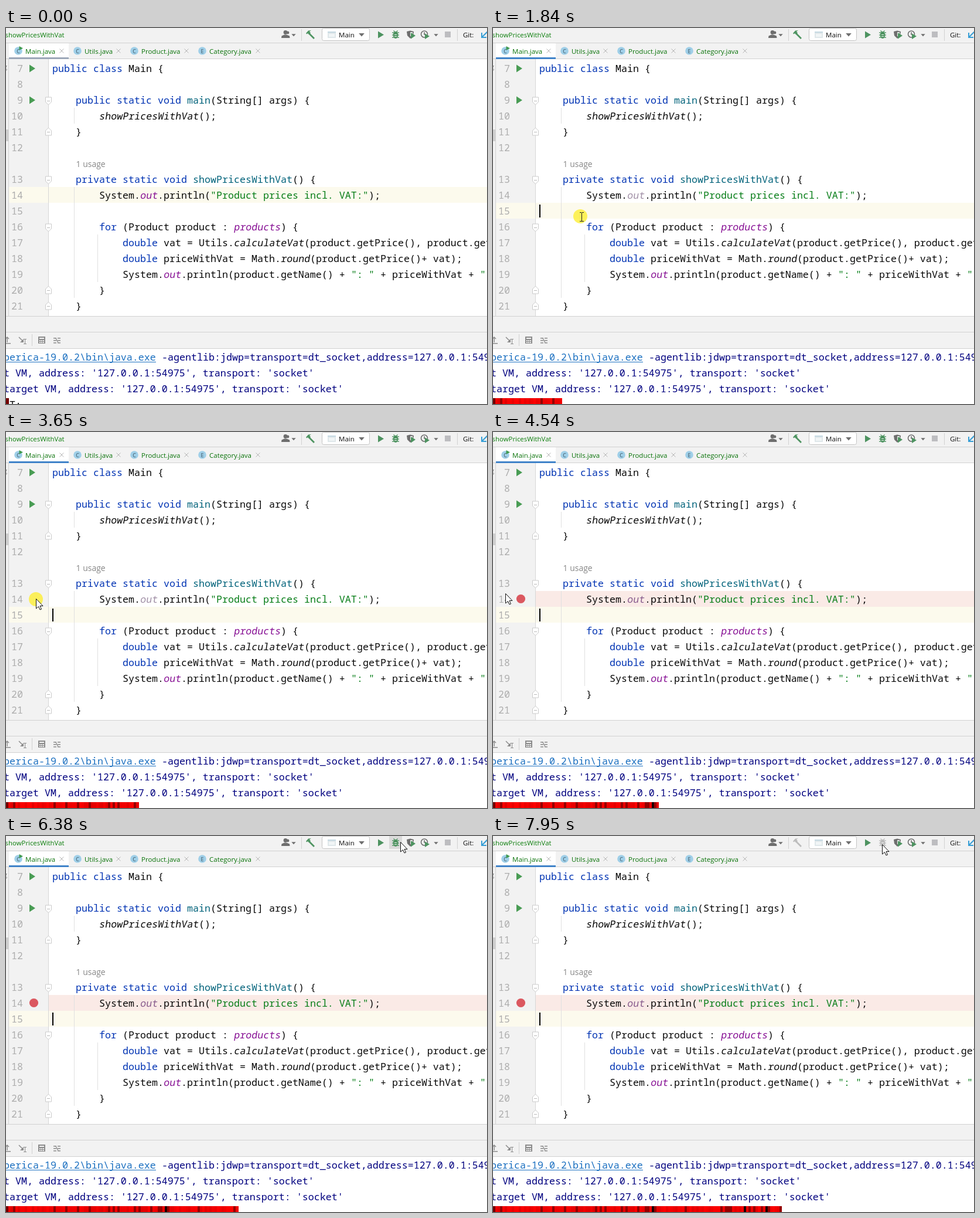
An HTML page with a canvas for the animation above (8 s loop, 821 by 641 pixels).

```html
<!DOCTYPE html>
<html lang="en">
<head>
<meta charset="utf-8">
<title>Setting a breakpoint</title>
<style>
html, body { margin: 0; width: 100%; height: 100%; overflow: hidden; background: #fff; }
canvas { display: block; }
</style>
</head>
<body>
<canvas id="stage" width="821" height="641"></canvas>
<script>
const ctx = document.getElementById('stage').getContext('2d');
const W = 821, H = 641, LOOP = 8000;
const MONO = '16.667px "Noto Sans Mono", monospace';
const UI = '"Open Sans", sans-serif';
const PANEL = '#f2f2f2', EDGE = '#d1d1d1', GREY = '#6e6e6e', GREEN = '#4d9360';
const INK = { k: '#0033b3', m: '#00627a', f: '#871094', s: '#067d17', p: '#080808', i: '#080808' };
const SLANT = .16;

// Event times in ms
const FOCUS = 1610, BREAK = 3700, LAUNCH = 7720;
const CLICKS = [[1640, 1900, 149, 321], [3600, 3860, 51, 285], [7480, 7780, 664, 14]];

// Pointer path: time, x, y
const PATH = [
  [250, 727, 641], [600, 550, 485], [810, 362, 348], [1490, 118, 306],
  [1640, 151, 322], [1900, 151, 322], [2400, 54, 283], [3020, 51, 283],
  [3280, 45, 283], [3600, 51, 284], [3900, 51, 284], [4540, 21, 275],
  [4950, 23, 276], [5060, 36, 274], [5760, 496, 159], [6250, 673, 10],
  [6900, 673, 10], [7300, 664, 14], [8000, 664, 14]
];

// Code rows: line number, column, then kind:text pieces
const CODE = [
  [7, 0, 'k:public class ', 'p:Main {'],
  [9, 4, 'k:public static void ', 'm:main', 'p:(String[] args) {'],
  [10, 8, 'i:showPricesWithVat', 'p:();'],
  [11, 4, 'p:}'],
  [13, 4, 'k:private static void ', 'm:showPricesWithVat', 'p:() {'],
  [14, 8, 'p:System.', 'f:out', 'p:.println(', 's:"Product prices incl. VAT:"', 'p:);'],
  [16, 8, 'k:for ', 'p:(Product product : ', 'f:products', 'p:) {'],
  [17, 12, 'k:double ', 'p:vat = Utils.', 'i:calculateVat', 'p:(product.getPrice(), product.getVat());'],
  [18, 12, 'k:double ', 'p:priceWithVat = Math.', 'i:round', 'p:(product.getPrice()+ vat);'],
  [19, 12, 'p:System.', 'f:out', 'p:.println(product.getName() + ', 's:": "', 'p: + priceWithVat + ', 's:" "'],
  [20, 8, 'p:}'],
  [21, 4, 'p:}']
];

const rowY = n => 75 + (n - 7 + (n > 12 ? 1 : 0)) * 27;

function box(x, y, w, h, color) {
  ctx.fillStyle = color;
  ctx.fillRect(x, y, w, h);
}

function text(s, x, y, color, font) {
  ctx.font = font;
  ctx.fillStyle = color;
  ctx.fillText(s, x, y);
}

function slanted(s, x, y, color) {
  ctx.save();
  ctx.transform(1, 0, -SLANT, 1, x - .5, y);
  text(s, 0, 0, color, MONO);
  ctx.restore();
}

const ui = (s, x, y, color = '#111', size = 11.5) => text(s, x, y, color, `${size}px ${UI}`);

function trace(pts, closed) {
  ctx.beginPath();
  for (let i = 0; i < pts.length; i += 2) ctx.lineTo(pts[i], pts[i + 1]);
  if (closed) ctx.closePath();
}

function poly(color, ...pts) {
  trace(pts, true);
  ctx.fillStyle = color;
  ctx.fill();
}

function line(color, width, ...pts) {
  trace(pts, false);
  ctx.strokeStyle = color;
  ctx.lineWidth = width;
  ctx.stroke();
}

function disc(x, y, r, color) {
  ctx.beginPath();
  ctx.arc(x, y, r, 0, Math.PI * 2);
  ctx.fillStyle = color;
  ctx.fill();
}

function ring(x, y, r, color, width) {
  ctx.beginPath();
  ctx.arc(x, y, r, 0, Math.PI * 2);
  ctx.strokeStyle = color;
  ctx.lineWidth = width;
  ctx.stroke();
}

const down = (x, y, r = 4) => poly(GREY, x - r, y - r / 2, x + r, y - r / 2, x, y + r / 2 + .5);

function bug(x, y, color) {
  for (const dy of [-3, 1, 5]) line(color, 1.4, x - 6, y + dy, x + 6, y + dy);
  line(color, 1.3, x - 3.5, y - 6.5, x - 1, y - 4, x + 1, y - 4, x + 3.5, y - 6.5);
  ctx.beginPath();
  ctx.ellipse(x, y + 1, 4.2, 6, 0, 0, Math.PI * 2);
  ctx.fillStyle = color;
  ctx.fill();
  box(x - 2, y, 4, 1, PANEL);
  box(x - 2, y + 3, 4, 1, PANEL);
}

function hammer(color) {
  line(color, 2.6, 517, 9, 526, 18);
  poly(color, 512, 9, 516, 4.5, 521, 4, 518, 6, 520, 8.5, 517, 11, 515, 9, 513.5, 10.5);
}

function toolbar(t, pos) {
  const busy = t >= LAUNCH;
  box(0, 0, W, 25, PANEL);
  ctx.textAlign = 'right';
  ui('showPricesWithVat', 99.5, 16, '#0a7d0a', 11.4);
  ctx.textAlign = 'left';

  disc(477, 7.5, 3.4, GREY);
  poly(GREY, 470, 17, 470.5, 13.5, 475, 11.5, 479, 11.5, 484, 13.5, 484.5, 17);
  disc(481, 8, 2.4, GREY);
  down(491, 12, 3.7);
  box(504, 2, 1, 20, EDGE);
  hammer(busy ? '#bcbcbc' : GREEN);

  ctx.beginPath();
  ctx.roundRect(539.5, .5, 81, 21, 3);
  ctx.fillStyle = '#fff';
  ctx.fill();
  ctx.strokeStyle = '#c4c4c4';
  ctx.lineWidth = 1;
  ctx.stroke();
  box(549, 6, 14, 11, '#dfe7ea');
  box(549, 6, 14, 2, '#c5d9e2');
  box(551, 10, 10, 5, '#f1f5f6');
  ui('Main', 568, 16);
  down(607, 11.5, 4.8);

  poly(GREEN, 635, 5.5, 645, 11.5, 635, 17.5);
  if (!busy && pos && pos[0] > 653 && pos[0] < 677 && pos[1] < 24) box(654, 0, 22, 22, '#dadada');
  bug(665, 11, busy ? '#bcbcbc' : GREEN);

  poly(GREY, 684, 6, 690, 4.5, 696, 6, 695, 12, 690, 18, 685, 13);
  box(690, 7, 4, 7, PANEL);
  poly(GREEN, 691, 8, 699, 13, 691, 18.5);
  ring(714, 10.5, 5.5, GREY, 1.6);
  line(GREY, 1.5, 714, 7, 714, 11, 717, 11);
  poly(GREEN, 715, 9.5, 723, 14, 715, 19);
  down(734, 12, 3.7);
  box(749, 6, 10, 10, '#bdbdc0');
  box(770, 2, 1, 20, EDGE);
  ui('Git:', 780, 16);
  line('#389fd6', 2, 823, 5, 813, 15);
  line('#389fd6', 2, 812, 8, 812, 16, 820, 16);
}

function tabs(t) {
  box(0, 25, W, 28, PANEL);
  box(0, 25, W, 1, EDGE);
  box(0, 52, W, 1, EDGE);
  box(5, 26, 102, 26, '#fff');
  box(5, 50, 102, 3, t < FOCUS ? '#9ca7b8' : '#4083c9');
  const list = [[21, 'Main', 95], [122, 'Utils', 192], [219, 'Product', 308], [335, 'Category', 430]];
  ctx.textAlign = 'center';
  for (const [x] of list) {
    disc(x, 39, 6.8, '#9fcfe8');
    ui(x === 335 ? 'E' : 'C', x, 42.5, '#38515f', 9);
  }
  ctx.textAlign = 'left';
  poly('#3f9a50', 22.5, 31, 29, 34.5, 22.5, 38);
  for (const [x, name, close] of list) {
    ui(name + '.java', x + 12, 44, '#0a730a');
    line('#b5b5b5', 1, close - 3.5, 35.5, close + 3.5, 42.5);
    line('#b5b5b5', 1, close + 3.5, 35.5, close - 3.5, 42.5);
  }
}

function fold(y, up) {
  const s = up ? -1 : 1;
  trace([67.5, y - 6 * s, 77.5, y - 6 * s, 77.5, y + 2 * s, 72.5, y + 7 * s, 67.5, y + 2 * s], true);
  ctx.fillStyle = '#fff';
  ctx.fill();
  ctx.strokeStyle = '#cbcbcb';
  ctx.lineWidth = 1;
  ctx.stroke();
  box(70, Math.floor(y), 5, 1, '#b9b9b9');
}

function editor(t) {
  box(0, 53, W, 438, '#fff');
  box(0, 53, 72, 438, PANEL);
  box(4, 53, 1, 438, EDGE);
  box(0, 173, 4, 20, '#cfcfcf');
  ui('g', -4, 70, '#8a8a8a', 11);
  box(5, t < FOCUS ? 271 : 298, W - 5, 27, '#fcfaed');
  if (t >= BREAK) box(73, 271, W - 73, 27, '#faeae6');
  box(72, 53, 1, 438, '#d6d6d6');
  box(116, 136, 1, 27, '#e0e0e0');
  box(116, 271, 1, 189, '#e0e0e0');
  box(156, 352, 1, 81, '#e0e0e0');

  for (let n = 7; n <= 21; n++) text(n, n < 10 ? 19 : 9, rowY(n), '#adadad', MONO);
  for (const y of [69, 123]) poly('#499c54', 40, y - 6.5, 50, y, 40, y + 6.5);
  for (const [y, up] of [[124, 0], [177, 1], [259, 0], [340, 0], [447, 1], [474, 1]]) fold(y, up);
  if (t >= BREAK) disc(47.5, 284.5, 7.6, '#db5860');

  ui('1 usage', 119.5, 237, '#868686', 14);
  for (const [n, col, ...parts] of CODE) {
    let x = 79 + col * 10;
    for (const part of parts) {
      const kind = part[0], s = part.slice(2);
      let color = INK[kind];
      if (n === 14 && kind === 'f' && t >= FOCUS) color = t < BREAK ? '#a08fa6' : '#875a8c';
      if (kind === 'f' || kind === 'i') slanted(s, x, rowY(n), color);
      else text(s, x, rowY(n), color, MONO);
      x += s.length * 10;
    }
  }
  const phase = t % 1000;
  if (t >= FOCUS && phase > 360 && phase < 975) box(79, 301, 2, 22, '#000');
}

function consolePane() {
  box(0, 491, W, 55, PANEL);
  for (const y of [491, 518, 546]) box(0, y, W, 1, EDGE);
  const c = '#8c8c8c';
  line(c, 1.5, 2, 536, 2, 527);
  line(c, 1.5, -1, 530, 2, 527, 5, 530);
  box(0, 537, 8, 1.5, c);
  line(c, 1.5, 22, 527, 29, 534);
  poly(c, 30, 530, 30, 536, 24, 536);
  line(c, 1, 30, 530.5, 35, 530.5);
  line(c, 1, 32.5, 531, 32.5, 538);
  line(c, 1, 30, 538.5, 35, 538.5);
  box(44, 522, 1, 20, EDGE);
  box(55, 526, 12, 12, c);
  box(57, 528, 8, 2, PANEL);
  for (let i = 0; i < 6; i++) box(57 + i % 3 * 3, 532 + (i > 2 ? 3 : 0), 2, 2, PANEL);
  for (const y of [528, 532, 536]) {
    box(81, y, 5, 1.5, c);
    box(88, y, 5, 1.5, c);
  }
  line(c, 1.2, 85, 528.7, 89, 536.5);

  box(0, 547, W, H - 547, '#fff');
  const navy = '#00007f', tail = " VM, address: '127.0.0.1:54975', transport: 'socket'";
  text('berica-19.0.2\\bin\\java.exe', -4, 567, '#1a6fc0', MONO);
  box(0, 569, 256, 1, '#1a6fc0');
  text('-agentlib:jdwp=transport=dt_socket,address=127.0.0.1:54975', 266, 567, navy, MONO);
  text('t' + tail, -4, 594, navy, MONO);
  text('target' + tail, -4, 621, navy, MONO);
  text('T:', 6, 648, '#080808', MONO);
}

const hash = i => {
  const v = Math.sin(i * 127.1 + 11.7) * 43758.5453;
  return v - Math.floor(v);
};

// Striped bar: one more cell per tick
function progress(t) {
  const cell = 4.04, count = Math.floor((t + 2) / 65.6) + 1;
  for (let i = 0; i < count; i++) {
    const h = hash(i), dark = i > 90 ? .4 : .2;
    const level = i === 0 ? 115 : h < dark * .3 ? 30 : h < dark ? 150 : 225 + 30 * hash(i + 300);
    const x = Math.round(i * cell), end = Math.round((i + 1) * cell + .6);
    box(x, 631, end - x, 10, `rgb(${Math.round(level)},0,0)`);
  }
}

function pointerAt(t) {
  if (t < PATH[0][0]) return null;
  const i = PATH.findIndex(p => p[0] > t);
  const a = PATH[i - 1], b = PATH[i];
  const u = (t - a[0]) / (b[0] - a[0]), e = u * u * (3 - 2 * u);
  return [a[1] + (b[1] - a[1]) * e, a[2] + (b[2] - a[2]) * e].map(Math.round);
}

function pointer(x, y) {
  const overText = x > 72 && y > 53 && (y < 491 || y > 546);
  if (overText) {
    box(x, y - 7, 1, 15, '#222');
    for (const dy of [-8, 7]) {
      box(x - 3, y + dy, 3, 1, '#222');
      box(x + 1, y + dy, 3, 1, '#222');
    }
    return;
  }
  trace([0, 0, 0, 16.5, 4, 13, 6.5, 18.5, 9, 17.5, 6.5, 12, 11.5, 12].map((v, i) => v + (i % 2 ? y : x) + .5), true);
  ctx.fillStyle = '#fff';
  ctx.fill();
  ctx.strokeStyle = '#111';
  ctx.lineWidth = 1;
  ctx.stroke();
}

function draw(t) {
  const pos = pointerAt(t);
  editor(t);
  toolbar(t, pos);
  tabs(t);
  consolePane();
  for (const [from, to, x, y] of CLICKS) {
    if (t >= from && t < to) disc(x, y, 12, 'rgba(253,238,40,.75)');
  }
  if (pos) pointer(...pos);
  progress(t);
}

const start = performance.now();
function tick() {
  draw((performance.now() - start) % LOOP);
  requestAnimationFrame(tick);
}
tick();
</script>
</body>
</html>
```
